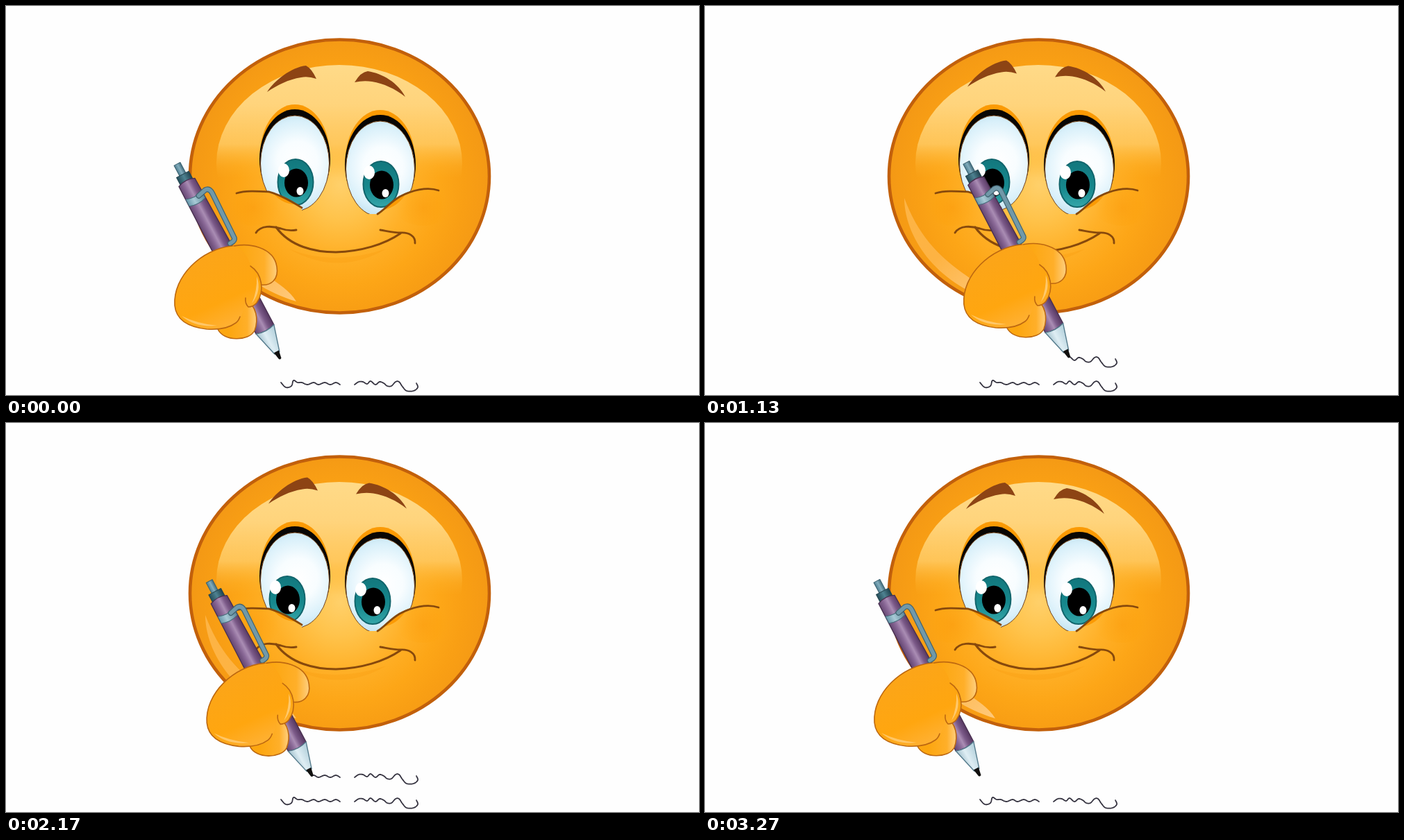
An HTML page with a canvas for the animation above (3.3 s loop, 998 by 561 pixels).

```html
<!DOCTYPE html>
<html>
<head>
<meta charset="utf-8">
<style>
html, body { margin: 0; width: 100%; height: 100%; overflow: hidden; background: #fefefe; }
canvas { display: block; }
</style>
</head>
<body>
<canvas id="stage" width="998" height="561"></canvas>
<script>
const ctx = document.getElementById('stage').getContext('2d');
const LOOP = 3300, STEP = 100 / 3, LINE_GAP = 35;
const TAU = Math.PI * 2;

// Handwriting, listed in the order it is written (right to left).
const SCRIBBLE = [
  [591, 509], [593, 515], [587, 520], [577, 520], [571, 514], [566, 507], [561, 507],
  [555, 513], [549, 513], [544, 509], [538, 507], [532, 511], [525, 506], [520, 510],
  [514, 507], [508, 507], [502, 511],
  [481, 511], [475, 508], [467, 511], [459, 508], [450, 511], [443, 508], [434, 511],
  [426, 508], [420, 508], [414, 505], [411, 513], [403, 515], [396, 508]
];
const GAP = 16, LAST = SCRIBBLE.length - 1;

const WRITE = [[265, 0], [560, 3], [730, 7], [1130, 12], [1560, 16], [1700, 17], [1900, 18.7], [2440, 25.8], [2720, LAST]];
const GAZE = [[30, 0], [230, 5], [360, 5], [730, 0], [1130, -4], [1900, -12], [2700, -12], [3200, -4], [3270, -2], [3300, 0]];
const BROW = [[30, 0], [230, 0.75], [330, 1], [2200, 1], [2670, 0]];
const SCROLL = [[2740, 0], [3200, LINE_GAP]];
const REACH_X = [[30, 395], [230, 600], [265, 591]];
const REACH_Y = [[30, 508], [230, 513], [265, 509]];

function track(keys, t) {
  if (t <= keys[0][0]) return keys[0][1];
  for (let i = 1; i < keys.length; i++) {
    const [t0, v0] = keys[i - 1], [t1, v1] = keys[i];
    if (t <= t1) return v0 + (v1 - v0) * (t - t0) / (t1 - t0);
  }
  return keys[keys.length - 1][1];
}

function scribbleAt(u) {
  const i = Math.min(Math.floor(u), LAST - 1), f = u - i;
  if (i === GAP) return [0, 1].map(k => SCRIBBLE[i][k] + (SCRIBBLE[i + 1][k] - SCRIBBLE[i][k]) * f);
  const lo = i < GAP ? 0 : GAP + 1, hi = i < GAP ? GAP : LAST;
  const p = [-1, 0, 1, 2].map(d => SCRIBBLE[Math.max(lo, Math.min(hi, i + d))]);
  return [0, 1].map(k => {
    const [a, b, c, d] = p.map(q => q[k]);
    return b + f * (c - a + f * (2 * a - 5 * b + 4 * c - d + f * (3 * (b - c) + d - a))) / 2;
  });
}

function writing(end, dy) {
  ctx.beginPath();
  for (const [from, to] of [[0, GAP], [GAP + 1, LAST]]) {
    const stop = Math.min(to, end);
    for (let u = from; u < stop + 0.1; u += 0.1) {
      const [x, y] = scribbleAt(Math.min(u, stop));
      u === from ? ctx.moveTo(x, y + dy) : ctx.lineTo(x, y + dy);
    }
    if (end <= GAP + 1) break;
  }
  ctx.strokeStyle = '#34323f';
  ctx.lineWidth = 1.8;
  ctx.stroke();
}

function shade(gradient, ...stops) {
  stops.forEach(([at, color]) => gradient.addColorStop(at, color));
  return gradient;
}
const linear = (x0, y0, x1, y1, ...stops) => shade(ctx.createLinearGradient(x0, y0, x1, y1), ...stops);
const radial = (x, y, r, ...stops) => shade(ctx.createRadialGradient(x, y, 0, x, y, r), ...stops);

function paint(path, fill, stroke, width) {
  if (fill) { ctx.fillStyle = fill; ctx.fill(path); }
  if (stroke) { ctx.strokeStyle = stroke; ctx.lineWidth = width; ctx.stroke(path); }
}
const shape = (d, fill, stroke, width) => paint(new Path2D(d), fill, stroke, width);

function oval(x, y, rx, ry, fill, stroke, width) {
  const path = new Path2D();
  path.ellipse(x, y, rx, ry, 0, 0, TAU);
  paint(path, fill, stroke, width);
}

function face() {
  oval(480.5, 245.5, 215.5, 197,
    radial(482, 258, 222, [0, '#ffd06a'], [0.22, '#ffc34b'], [0.45, '#ffb027'], [0.65, '#fda617'], [0.8, '#f99f14'], [1, '#f39815']),
    '#c2600b', 4.6);
  oval(480, 227, 177, 142,
    linear(0, 85, 0, 248, [0, '#ffda88'], [0.35, '#ffd47c'], [0.7, 'rgba(255,200,94,.9)'], [0.9, 'rgba(255,185,55,.25)'], [1, 'rgba(255,180,45,0)']));
  shape('M287 277C287 330 330 400 418 426C408 410 394 402 378 390C334 360 306 328 287 277Z',
    linear(285, 280, 410, 425, [0, '#fdb445'], [0.5, '#fdb343'], [1, '#ffc878']));
  for (const x of [356, 601]) {
    oval(x, 291, 40, 26, radial(x, 291, 40, [0, 'rgba(250,146,0,.32)'], [0.6, 'rgba(253,160,8,.2)'], [1, 'rgba(255,170,20,0)']));
  }
}

function eye(x, y, irisY, gaze, lidClip) {
  oval(x, y - 6, 50, 72, '#fb9a04');
  ctx.save();
  ctx.clip(new Path2D(lidClip));
  oval(x, y + 1, 51, 72, '#080604');
  oval(x, y + 7, 49.5, 69,
    radial(x + 4, y + 4, 72, [0, '#ffffff'], [0.4, '#f8fdff'], [0.8, '#d9f0fa'], [1, '#c3e3f1']), '#754013', 1);
  const ix = x + 1 + gaze;
  oval(ix, irisY, 25.5, 33, linear(0, irisY - 33, 0, irisY + 33, [0, '#12777d'], [0.6, '#17898e'], [1, '#35a6a9']), '#11656c', 2);
  oval(ix + 1, irisY + 1, 17, 20.5, '#000');
  oval(ix - 17, irisY - 17, 8, 10, '#fff');
  oval(ix + 6.5, irisY + 13, 5, 6, '#fff');
  ctx.restore();
}

function features(gaze, brow) {
  eye(416, 220, 254, gaze, 'M340 130H478V300H428L425 291Q399 274 380 268L340 266Z');
  eye(539, 228, 257, gaze, 'M476 140H612V262Q580 263 560 279Q546 289 535 300H476Z');
  const line = '#87490c';
  shape('M332 270C345 266 361 267 379 268C397 273 413 283 426 291', null, line, 2.8);
  shape('M623 266C606 260 584 266 567 275C552 284 545 294 535 300', null, line, 2.8);
  shape('M389 319C409 347 445 355 475 355C511 354 545 344 568 328', null, line, 3.1);
  shape('M360 327C367 316 383 317 396 321Q407 325 418 323', null, line, 2.9);
  shape('M539 323C551 325 560 327 568 327C580 326 590 332 589 342', null, line, 2.9);
  shape('M407 350Q470 376 548 350Q478 391 407 350Z', 'rgba(245,145,5,.22)');

  ctx.save();
  ctx.translate(2 * brow, -7.5 * brow);
  shape('M376 124C386 108 411 88 432 86Q440 90 447 105Q435 101 425 103C406 106 391 114 376 124Z', '#8d4414');
  shape('M502 110Q511 95 521 94C542 97 565 111 575 131C560 119 544 112 527 109Q515 107 502 110Z', '#8d4414');
  ctx.restore();
}

function pen() {
  ctx.save();
  ctx.translate(395, 509);
  ctx.rotate(-0.486);
  const edge = '#493050';
  shape('M-5 -318H5V-297H-5Z', linear(-5, 0, 5, 0, [0, '#517f91'], [0.5, '#82adbd'], [1, '#426b7b']), '#3c6371', 1);
  shape('M-10 -301H10V-288H-10Z', linear(-10, 0, 10, 0, [0, '#244c58'], [0.5, '#4e8291'], [1, '#1f424d']), '#24444e', 1);
  shape('M-13 -288Q0 -294 13 -288L15 -180V-48Q0 -43 -14 -48V-180Z',
    linear(-14, 0, 15, 0, [0, '#62446f'], [0.3, '#8a6997'], [0.5, '#aa8db4'], [0.7, '#7b5a88'], [1, '#553760']), edge, 1.3);
  shape('M-13 -267Q0 -262 13 -267V-256Q0 -251 -13 -256Z',
    linear(-13, 0, 13, 0, [0, '#6797aa'], [0.4, '#a8cad6'], [1, '#5b8799']), '#476c7b', 1);
  const clip = 'M6 -263L18 -266Q25 -266 25 -257L23 -185Q22 -181 14 -181';
  shape(clip, null, '#416471', 8);
  shape(clip, null, '#7199a9', 5.5);
  shape('M-14 -48Q0 -43 15 -48L4 -10H-4Z',
    linear(-13, 0, 13, 0, [0, '#a8c5d1'], [0.4, '#dfeef4'], [1, '#b3d0db']), '#557b8c', 1.4);
  shape('M-4 -12H4L2 -1Q0 2 -2 -1Z', '#11100f');
  ctx.restore();
}

function hand() {
  const line = '#bd6810';
  const skin = linear(270, 350, 330, 480, [0, '#fba51b'], [0.6, '#ffa60f'], [0.9, '#ffb238'], [1, '#ffc565']);
  const finger = (x0, x1) => linear(x0, 0, x1, 0, [0, '#fca60f'], [0.65, '#ffaf29'], [1, '#ffd287']);
  shape('M345 423C361 433 364 452 358 468C350 484 313 484 305 466Q318 440 345 423Z', finger(320, 362), line, 1.6);
  shape('M318 349C350 338 386 349 390 376C393 394 382 404 366 402L335 373Z', finger(335, 392), line, 1.6);
  shape('M243 432C240 390 282 350 326 346Q345 349 353 376C369 386 373 411 361 428Q355 434 348 435Q345 429 345 423Q342 448 331 457C319 466 304 467 289 466C262 463 245 452 243 432Z', skin);
  shape('M326 346C282 350 240 390 243 432C245 452 262 463 289 466C304 467 319 466 331 457Q335 454 337 448', null, line, 1.6);
  shape('M352 375C369 386 373 411 361 428Q356 434 349 434Q344 429 345 421', null, line, 1.6);
  shape('M361 390Q369 410 354 429Q362 411 361 390Z', 'rgba(255,214,142,.7)');
  shape('M253 447Q272 464 304 461Q275 458 253 447Z', 'rgba(255,216,145,.65)');
}

function draw(t) {
  ctx.fillStyle = '#fefefe';
  ctx.fillRect(0, 0, 998, 561);
  ctx.lineCap = ctx.lineJoin = 'round';

  const written = track(WRITE, t);
  const [x, y] = t < 265 ? [track(REACH_X, t), track(REACH_Y, t)] : scribbleAt(written);
  const scroll = track(SCROLL, t);

  face();
  features(track(GAZE, t), track(BROW, t));
  writing(LAST, LINE_GAP + scroll);
  if (t > 265) writing(written, scroll);

  ctx.save();
  ctx.translate(x - 395, y - 508);
  pen();
  hand();
  ctx.restore();
}

const start = performance.now();
function tick() {
  const t = (performance.now() - start) % LOOP;
  draw(Math.floor((t + 4) / STEP) * STEP % LOOP);
  requestAnimationFrame(tick);
}
tick();
</script>
</body>
</html>
```
